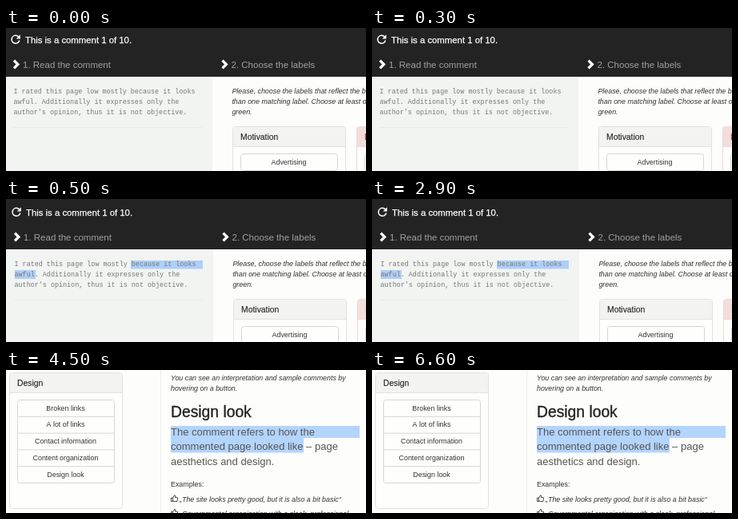
Write an HTML page with a canvas that moves like this. It is 450 by 179 pixels and loops after 8000 ms.

```html
<!DOCTYPE html>
<html lang="en">
<head>
<meta charset="utf-8">
<title>Comment labelling</title>
<style>
html, body { margin: 0; width: 100%; height: 100%; overflow: hidden; background: #fdfdfb; }
canvas { display: block; width: 450px; height: 179px; }
</style>
</head>
<body>
<canvas id="stage"></canvas>
<script>
const W = 450, H = 179, LOOP = 8000;
const SELECT_AT = 500, DETAILS_AT = 4500;
const SANS = '"Liberation Sans", Arial, sans-serif';
const MONO = '"Liberation Mono", monospace';
const INK = '#333', LINE = '#e2e3e1', SELECTION = '#b3d4fd';

const canvas = document.getElementById('stage');
const ctx = canvas.getContext('2d');
const ratio = window.devicePixelRatio || 1;
canvas.width = W * ratio;
canvas.height = H * ratio;

function rect(x, y, w, h, color) {
  ctx.fillStyle = color;
  ctx.fillRect(x, y, w, h);
}

// "weight" adds a thin outline for a medium weight.
function text(str, x, y, size, { color = INK, style = '', family = SANS, align = 'left', weight = 0 } = {}) {
  ctx.font = `${style} ${size}px ${family}`;
  ctx.textAlign = align;
  ctx.fillStyle = color;
  ctx.fillText(str, x, y);
  if (weight) {
    ctx.strokeStyle = color;
    ctx.lineWidth = weight;
    ctx.strokeText(str, x, y);
  }
}

function lines(rows, x, y, step, size, options) {
  rows.forEach((row, i) => text(row, x, y + i * step, size, options));
}

function box(x, y, w, h, r, fill, stroke) {
  ctx.beginPath();
  ctx.roundRect(x + 0.5, y + 0.5, w, h, r);
  ctx.fillStyle = fill;
  ctx.fill();
  ctx.strokeStyle = stroke;
  ctx.lineWidth = 1;
  ctx.stroke();
}

function panel(x, y, w, h, title, { head = '#f3f4f2', border = LINE, color = '#222' } = {}) {
  box(x, y, w, h, 3, '#fefefd', border);
  ctx.beginPath();
  ctx.roundRect(x + 1, y + 1, w - 1, 24, [2, 2, 0, 0]);
  ctx.fillStyle = head;
  ctx.fill();
  rect(x + 1, y + 25, w - 1, 1, border);
  text(title, x + 10, y + 17, 10.4, { color, weight: 0.12 });
}

function buttons(labels, x, y, w, h) {
  const border = '#d6d7d5';
  box(x, y, w, h * labels.length, 3, '#fefefd', border);
  labels.forEach((label, i) => {
    if (i) rect(x + 1, y + h * i, w - 1, 1, border);
    text(label, x + w / 2, y + h * i + 13.5, 8.9, { align: 'center' });
  });
}

function chevron(x, y) {
  ctx.beginPath();
  ctx.moveTo(x + 1.5, y + 1.2);
  ctx.lineTo(x + 6.3, y + 6);
  ctx.lineTo(x + 1.5, y + 10.8);
  ctx.strokeStyle = '#fff';
  ctx.lineWidth = 3.3;
  ctx.stroke();
}

function refresh(x, y) {
  ctx.beginPath();
  ctx.arc(x, y, 4.9, 0.25, Math.PI * 1.75);
  ctx.strokeStyle = '#fff';
  ctx.lineWidth = 1.6;
  ctx.stroke();
  ctx.beginPath();
  ctx.moveTo(x + 5.8, y - 6);
  ctx.lineTo(x + 5.8, y - 0.8);
  ctx.lineTo(x + 0.8, y - 0.8);
  ctx.fillStyle = '#fff';
  ctx.fill();
}

function thumb(x, y) {
  ctx.strokeStyle = '#333';
  ctx.lineWidth = 0.9;
  ctx.lineJoin = 'round';
  ctx.strokeRect(x + 0.5, y + 4, 2, 4.5);
  ctx.beginPath();
  ctx.moveTo(x + 2.5, y + 4.3);
  ctx.lineTo(x + 4.6, y + 0.7);
  ctx.quadraticCurveTo(x + 6.4, y + 0.5, x + 5.5, y + 3.6);
  ctx.lineTo(x + 8.3, y + 3.6);
  ctx.quadraticCurveTo(x + 9, y + 5, x + 7.8, y + 8.5);
  ctx.lineTo(x + 4.2, y + 8.5);
  ctx.lineTo(x + 2.5, y + 7.7);
  ctx.stroke();
  ctx.lineJoin = 'miter';
}

function commentPage(selected) {
  rect(0, 0, W, H, '#fdfdfb');
  ctx.save();
  if (selected) ctx.translate(1, 2);

  rect(-1, 60, 259, 121, '#f2f4f2');
  rect(-1, -2, W + 1, 63, '#222322');
  refresh(12, 14.3);
  text('This is a comment 1 of 10.', 24, 18.5, 11.35, { color: '#fff', weight: 0.25 });
  chevron(8.5, 39.5);
  text('1. Read the comment', 21, 50, 11.5, { color: '#a0a09f' });
  chevron(269, 39.5);
  text('2. Choose the labels', 281.5, 50, 11.5, { color: '#a0a09f' });

  if (selected) {
    rect(155, 75, 90, 10.5, '#aecff8');
    rect(10, 87, 26, 11, '#aecff8');
  }
  lines([
    'I rated this page low mostly because it looks',
    'awful. Additionally it expresses only the',
    "author's opinion, thus it is not objective."
  ], 9.5, 82, 12.9, 8.42, { color: '#777', family: MONO });
  rect(9, 124, 236, 1, '#e8eae8');

  lines([
    'Please, choose the labels that reflect the best',
    'than one matching label. Choose at least one',
    'green.'
  ], 282.4, 82, 13, 8.9, { style: 'italic' });
  panel(283, 123, 141, 80, 'Motivation');
  buttons(['Advertising'], 293, 157, 121, 21);
  panel(438, 123, 141, 80, 'Intent', { head: '#f2dedd', border: '#f0d5d8', color: '#a94442' });
  buttons([''], 448, 157, 121, 21);
  ctx.restore();
}

function detailsPage() {
  rect(0, 0, W, H, '#fdfdfb');
  rect(193, 0, 1, H, '#eeefed');
  panel(4, 3, 141, 170, 'Design');
  buttons(['Broken links', 'A lot of links', 'Contact information',
    'Content organization', 'Design look'], 14, 37, 121, 20.8);

  lines(['You can see an interpretation and sample comments by', 'hovering on a button.'],
    206, 13, 13, 8.87, { style: 'italic' });
  text('Design look', 206, 59, 19.3, { color: '#222', weight: 0.35 });

  rect(206, 70, 236, 15, SELECTION);
  rect(206, 85, 166, 18.5, SELECTION);
  lines([
    'The comment refers to how the',
    'commented page looked like – page',
    'aesthetics and design.'
  ], 206, 82, 18.4, 13, { color: '#555' });

  text('Examples:', 206, 146, 8.9);
  ['„The site looks pretty good, but it is also a bit basic“',
    '„Governmental organization with a sleek, professional'].forEach((quote, i) => {
    const y = 165 + i * 17.5;
    thumb(206, y - 9);
    text(quote, 217, y, 8.9, { style: 'italic' });
  });
}

function draw(now) {
  const t = (now - start) % LOOP;
  ctx.setTransform(ratio, 0, 0, ratio, 0, 0);
  if (t < DETAILS_AT) commentPage(t >= SELECT_AT);
  else detailsPage();
  requestAnimationFrame(() => draw(performance.now()));
}

const start = performance.now();
draw(start);
</script>
</body>
</html>
```
